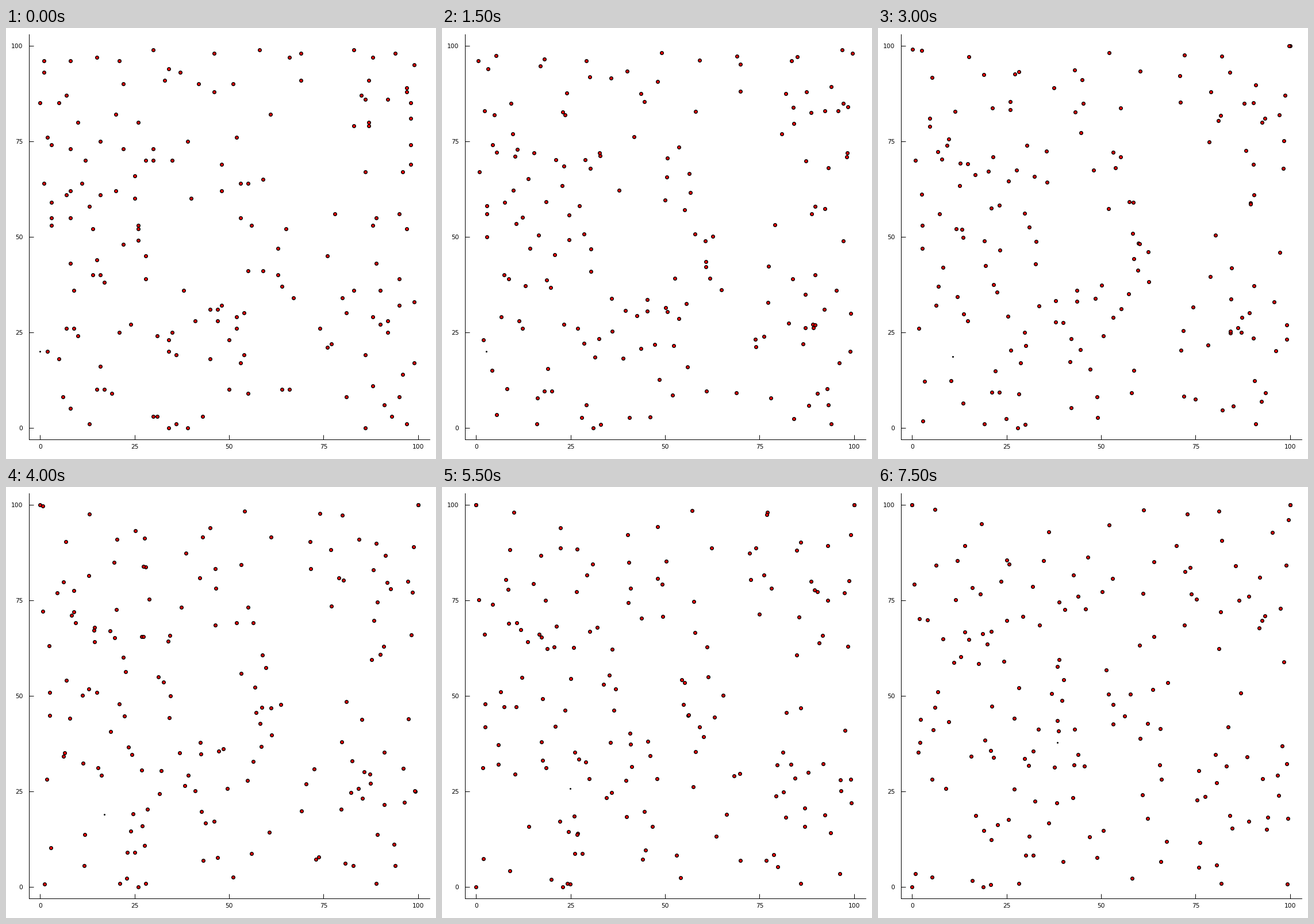
Animation of 748 by 749 pixels, one loop 8000 ms. Source, as a matplotlib script:

```python
import numpy as np
import matplotlib.pyplot as plt
from matplotlib.animation import FuncAnimation

W, H, DPI = 748, 749, 64
PX = 72 / DPI  # points per pixel
FRAMES, INTERVAL = 16, 500
STEP = 1.013   # distance covered per frame
CROWD = 110

# Walkers by the corner they head for
WALKERS = {
    (0, 0): [(30, 99), (5, 85), (10, 80), (30, 73), (3, 59),
             (3, 53), (22, 48), (38, 36), (34, 20), (34, 0),
             (36, 1), (97, 1), (95, 32), (98, 85), (55, 41)],
    (100, 0): [(58, 99), (1, 96), (15, 97), (0, 85), (42, 90),
               (83, 99), (69, 98), (97, 52), (99, 33), (13, 1),
               (43, 3), (53, 17), (17, 10), (74, 26), (52, 76)],
    (0, 100): [(1, 93), (1, 64), (3, 55), (2, 20), (7, 26),
               (8, 96), (21, 96), (26, 80), (47, 31), (40, 60),
               (50, 10), (86, 0), (95, 8), (64, 37), (41, 28)],
    (100, 100): [(99, 95), (94, 98), (98, 69), (98, 81), (99, 17),
                 (93, 3), (39, 0), (52, 26), (53, 55), (48, 69),
                 (37, 93), (20, 62), (26, 49), (83, 36), (59, 41)],
}

# Runner: frame, x, y
RUN = np.array([(0, 0, 20), (2, 1, 20), (4, 5, 19.8), (6, 10.8, 18.6),
                (10, 22.8, 22.1), (13, 29.5, 33.9), (15, 38.5, 37.7)])


def make_walkers():
    """Start points and goals: the listed walkers plus a random crowd."""
    rng = np.random.default_rng(20)
    start = [p for group in WALKERS.values() for p in group]
    goal = [g for g, group in WALKERS.items() for _ in group]
    corners = list(WALKERS)
    while len(start) < len(WALKERS) * 15 + CROWD:
        x, y = rng.integers(2, 99, 2)
        in_void = ((x - 44) / 10) ** 2 + ((y - 46) / 15) ** 2 < 1
        if not in_void and (x, y) not in start:
            start.append((x, y))
            goal.append(corners[rng.integers(4)])
    return np.array(start, float), np.array(goal, float)


def hermite(t, keys):
    """Smooth path through rows of (time, x, y)."""
    times, pts = keys[:, 0], keys[:, 1:]
    slope = np.gradient(pts, times, axis=0)
    k = min(np.searchsorted(times, t, side="right") - 1, len(times) - 2)
    h = times[k + 1] - times[k]
    u = (t - times[k]) / h
    return ((1 + 2 * u) * (1 - u) ** 2 * pts[k]
            + u * (1 - u) ** 2 * h * slope[k]
            + u * u * (3 - 2 * u) * pts[k + 1]
            + u * u * (u - 1) * h * slope[k + 1])


start, goal = make_walkers()
reach = np.linalg.norm(goal - start, axis=1, keepdims=True)
heading = (goal - start) / reach

plt.rcParams["font.family"] = "DejaVu Sans"
fig = plt.figure(figsize=(W / DPI, H / DPI), dpi=DPI, facecolor="white")
ax = fig.add_axes([39.5 / W, 34.5 / H, 697 / W, 703.5 / H])
ax.set(xlim=(-3, 103), ylim=(-3, 103),
       xticks=range(0, 101, 25), yticks=range(0, 101, 25))
ax.spines[["top", "right"]].set_visible(False)
ax.spines[["left", "bottom"]].set_linewidth(PX)
ax.tick_params(direction="in", length=8 * PX, width=PX, labelsize=10.67 * PX)
ax.tick_params(axis="x", pad=8.5 * PX)
ax.tick_params(axis="y", pad=10 * PX)

dots, = ax.plot([], [], "o", ms=5.6 * PX, mfc="red", mec="black",
                mew=1.4 * PX, clip_on=False)
runner, = ax.plot([], [], "o", ms=3 * PX, color="black", mew=0)


def draw(i):
    pos = start + heading * np.minimum(STEP * i, reach)
    dots.set_data(pos[:, 0], pos[:, 1])
    x, y = hermite(i, RUN)
    runner.set_data([x], [y])
    return dots, runner


anim = FuncAnimation(fig, draw, frames=FRAMES, interval=INTERVAL,
                     repeat=True, repeat_delay=0)
plt.show()
```
